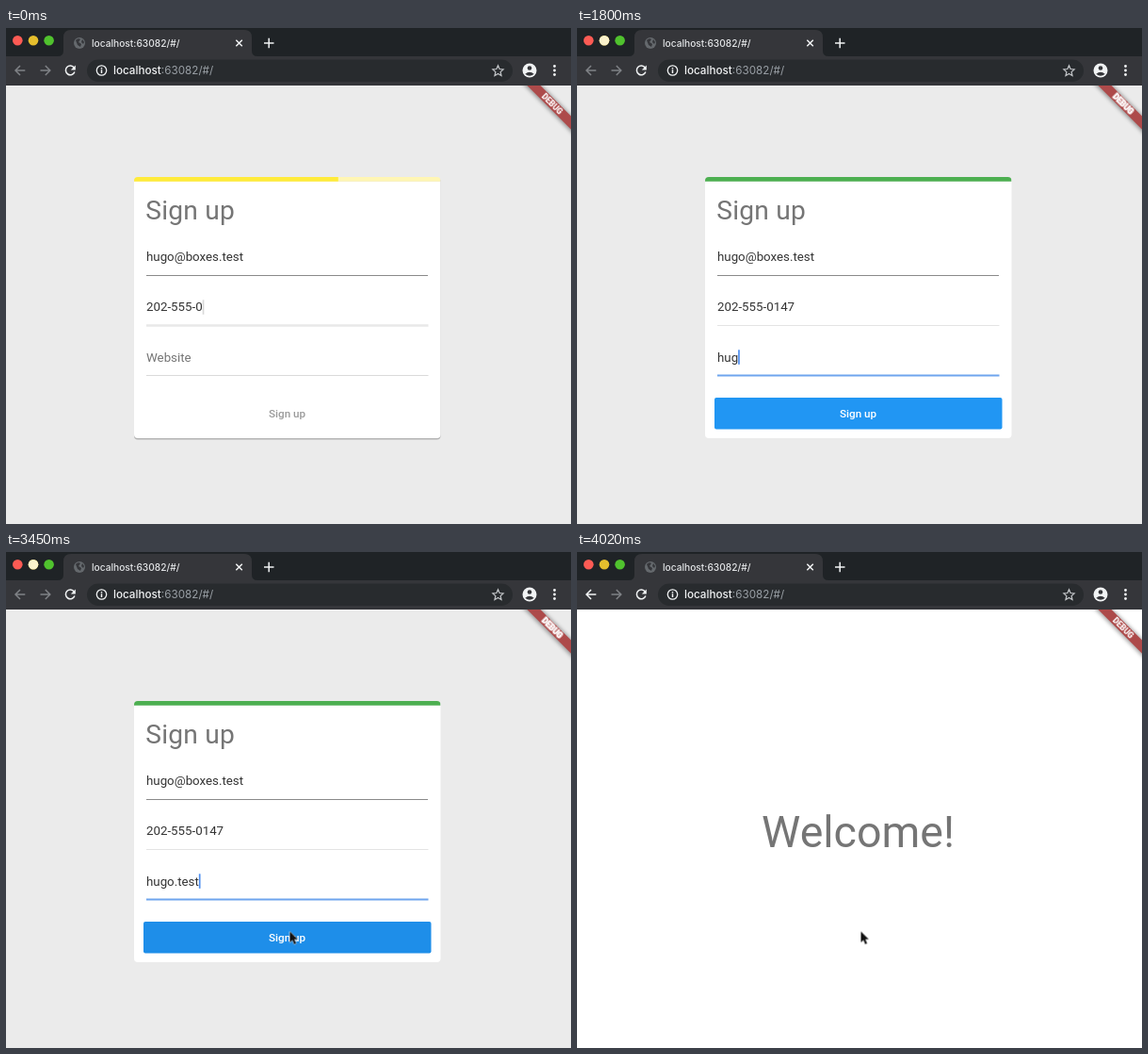
An HTML page for the animation above (4230 ms loop, 600x526 px).

```html
<!DOCTYPE html>
<html lang="en">
<head>
<meta charset="utf-8">
<title>Sign up</title>
<style>
  html, body { margin: 0; width: 100%; height: 100%; overflow: hidden; background: #ebebeb; }
  svg { display: block; width: 600px; height: 526px; }
  text { font-family: Roboto, Arial, sans-serif; white-space: pre; }
  .ui { font-family: Inter, "Open Sans", sans-serif; }
  .field { font-size: 13.3px; fill: #333; }
  .hint { fill: #757575; }
  .anim { animation: 4230ms linear infinite; }

  #pale { animation-name: pale; }
  @keyframes pale { 0%, 29.07% { opacity: 0 } 29.08%, 92.2% { opacity: 1 } 92.21%, 100% { opacity: 0 } }

  #back { animation-name: back; }
  @keyframes back { 0%, 84.39% { stroke: #7f8286 } 84.4%, 100% { stroke: #f1f3f4 } }

  #idle { animation-name: idle; }
  @keyframes idle { 0%, 29.07% { opacity: 1 } 29.08%, 100% { opacity: 0 } }

  #bar { transform-origin: 136px 0; animation-name: bar; }
  @keyframes bar {
    0%, 29.08% { transform: scaleX(.666); fill: #ffeb3b }
    38.53%, 100% { transform: none; fill: #4caf50 }
  }

  #line2 { animation-name: line2; }
  @keyframes line2 {
    0%, 14.89% { stroke: #e8e8e8; stroke-width: 2.6px }
    20.57%, 29.07% { stroke: #8a8a8a; stroke-width: 1px }
    29.08%, 83.68% { stroke: #e4e4e4; stroke-width: 1px }
    83.69%, 100% { stroke: #8a8a8a; stroke-width: 1px }
  }
  #line3 { animation-name: line3; }
  @keyframes line3 {
    0%, 14.89% { stroke: #dadada; stroke-width: 1.2px }
    20.57%, 29.07% { stroke: #e8e8e8; stroke-width: 2.6px }
    29.08%, 83.68% { stroke: #6fa5ee; stroke-width: 2px }
    83.69%, 100% { stroke: #a3b1cf; stroke-width: 1.6px }
  }

  #button { animation-name: button; }
  @keyframes button {
    0%, 29.08% { fill: #fff }
    33.81%, 75.18% { fill: #2196f3 }
    78.01%, 100% { fill: #1e8ee9 }
  }
  #label { animation-name: label; }
  @keyframes label { 0%, 29.08% { fill: #9a9a9a } 33.81%, 100% { fill: #fff } }

  #veil { animation-name: veil; }
  @keyframes veil {
    0%, 84.54% { opacity: 0; animation-timing-function: cubic-bezier(.42, 0, 1, 1) }
    91.63%, 100% { opacity: 1 }
  }
  #rise { animation-name: rise; }
  @keyframes rise {
    0%, 84.54% { transform: translateY(116px); animation-timing-function: cubic-bezier(.4, 0, .2, 1) }
    91.63%, 100% { transform: none }
  }
  #welcome { animation-name: welcome; }
  @keyframes welcome {
    0%, 84.54% { opacity: 0; animation-timing-function: cubic-bezier(.75, 0, 1, .8) }
    91.63%, 100% { opacity: 1 }
  }

  #debug { animation-name: debug; }
  @keyframes debug {
    0%, 29.07% { stroke-opacity: 0 } 29.08%, 84.39% { stroke-opacity: .75 } 84.4%, 100% { stroke-opacity: 0 }
  }

  #mouse { animation-name: mouse; }
  @keyframes mouse {
    0%, 66.66% { opacity: 0; transform: translate(166px, 350px) }
    66.67% { opacity: 1; transform: translate(166px, 350px); animation-timing-function: ease-in-out }
    78.72%, 100% { opacity: 1; transform: translate(301.5px, 402.5px) }
  }
</style>
</head>
<body>
<svg viewBox="0 0 600 526">
  <defs>
    <clipPath id="page"><rect y="61" width="600" height="465"/></clipPath>
    <filter id="soft" x="-20%" y="-60%" width="140%" height="220%"><feGaussianBlur stdDeviation="2"/></filter>
  </defs>
  <rect width="600" height="526" fill="#ebebeb"/>

  <!-- sign-up card -->
  <g id="idle" class="anim">
    <rect x="136" y="159" width="325.5" height="277.6" rx="4" fill="#b3b3b3"/>
  </g>
  <path d="M136 162.5H461.5V431a4 4 0 0 1-4 4H140a4 4 0 0 1-4-4Z" fill="#fff"/>
  <clipPath id="cap"><path d="M136 163V162a4 4 0 0 1 4-4H457.500a4 4 0 0 1 4 4V163Z"/></clipPath>
  <g clip-path="url(#cap)">
    <rect x="136" y="158" width="325.5" height="4.7" fill="#ebebeb"/>
    <g class="anim" style="animation-name: idle">
      <rect x="136" y="158" width="325.5" height="4.7" fill="#fff6b4"/>
    </g>
    <rect id="bar" class="anim" x="136" y="158" width="325.5" height="4.7"/>
  </g>
  <text x="148.3" y="202.8" font-size="28.2" letter-spacing=".2" fill="#757575">Sign up</text>
  <text class="field" x="149" y="247.300">hugo@boxes.test</text>
  <text class="field" x="149" y="300.4" id="phone"></text>
  <text class="field" x="149" y="353.5" id="site"></text>
  <path d="M149 262.500H448" stroke="#8a8a8a"/>
  <path id="line2" class="anim" d="M149 315.500H448.500"/>
  <path id="line3" class="anim" d="M149 368.500H448.500"/>
  <rect id="caret" width="1.7" height="15.5"/>
  <rect id="button" class="anim" x="146" y="392" width="305.500" height="33.500" rx="2"/>
  <text id="label" class="anim" x="298.600" y="413" font-size="11.7" font-weight="500" text-anchor="middle">Sign up</text>

  <!-- next page -->
  <rect id="veil" class="anim" y="61" width="600" height="465" fill="#fff"/>
  <g clip-path="url(#page)">
    <g id="rise" class="anim">
      <text id="welcome" class="anim" x="298.5" y="312.500" font-size="46.5" text-anchor="middle" fill="#757575">Welcome!</text>
    </g>
    <g transform="translate(580 80.500) rotate(45)">
      <rect x="-45" y="-5.5" width="90" height="12" fill="#000" opacity=".4" filter="url(#soft)"/>
      <rect x="-45" y="-5" width="90" height="10" fill="#ad4a4a"/>
      <text id="debug" class="anim" y="3" font-size="8.5" font-weight="900" text-anchor="middle" fill="#fff" stroke="#fff" stroke-width=".9">DEBUG</text>
    </g>
  </g>

  <!-- browser frame -->
  <rect width="600" height="31" fill="#1f2326"/>
  <rect y="30" width="600" height="31" fill="#35363a"/>
  <path d="M55 30q6 0 6-6V10q0-8 8-8H253q8 0 8 8V24q0 6 6 6Z" fill="#35363a"/>
  <rect x="86" y="33.500" width="452" height="23.500" rx="11.750" fill="#282b2e"/>
  <circle cx="12.300" cy="13.300" r="5.300" fill="#fc5b54"/>
  <circle cx="29" cy="13.300" r="5.300" fill="#e6bf2d"/>
  <circle id="pale" class="anim" cx="29" cy="13.300" r="5.300" fill="#faf2cc"/>
  <circle cx="45.600" cy="13.300" r="5.300" fill="#50c22e"/>
  <circle cx="78" cy="16" r="6" fill="#65696d"/>
  <path d="M74 13q3-3 5-1l-2 3 3 2-1 3-3-2ZM81 12l2 3-1 2-2-2Z" fill="#35363a"/>
  <text class="ui" x="91" y="19.700" font-size="10.2" font-weight="500" fill="#e4e6e8">localhost:63082/#/</text>
  <text class="ui" x="114" y="49.300" font-size="11.7" fill="#9aa0a6"><tspan fill="#f1f3f4" font-weight="500">localhost</tspan>:63082/#/</text>
  <g fill="none" stroke="#f1f3f4" stroke-width="1.5">
    <path d="M244.300 12.700l6.500 6.500m0-6.500l-6.500 6.500M274 16h10.500M279.200 10.800v10.500"/>
    <path id="back" class="anim" d="M20.300 45H10.200M15 40l-5 5 5 5"/>
    <path d="M36.500 45H46.600M41.800 40l5 5-5 5" stroke="#7f8286"/>
    <path d="M72.300 42a4.900 4.900 0 1 0 .6 4.500"/>
    <path d="M73.800 39.500v5h-5Z" fill="#f1f3f4" stroke="none"/>
    <circle cx="101.500" cy="45" r="5.200" stroke-width="1.300"/>
    <path d="M101.500 44.300v3.600M101.500 42v1.400"/>
    <path d="M522.500 39.800l1.600 3.700 4 .4-3 2.700.9 4-3.500-2.100-3.500 2.100.9-4-3-2.700 4-.4Z" stroke="#c5c8cb" stroke-width="1.200"/>
  </g>
  <circle cx="556" cy="45" r="7.500" fill="#f1f3f4"/>
  <g fill="#35363a">
    <circle cx="556" cy="42.500" r="2.300"/>
    <path d="M551.300 48.700q4.700-4 9.400 0-4.700 4.200-9.400 0Z"/>
  </g>
  <g fill="#f1f3f4">
    <circle cx="582.500" cy="40.500" r="1.400"/>
    <circle cx="582.500" cy="45" r="1.400"/>
    <circle cx="582.500" cy="49.500" r="1.400"/>
  </g>

  <path id="mouse" class="anim" d="M0 0V11.500L2.700 9 4.600 13.400 6.600 12.500 4.700 8.200H8.300Z" fill="#111" stroke="#fff" stroke-width="1" paint-order="stroke"/>
</svg>
<script>
  const LOOP = 4230, STEP = 30;
  const FOCUS_SITE = 870, TYPE_SITE = 1230, BLUR = 3540;
  const get = id => document.getElementById(id);
  const phone = get('phone'), site = get('site'), caret = get('caret');

  const phoneKeys = [90, 270, 480];
  const siteKeys = [TYPE_SITE, 1410, 1590, 1830, 2100, 2280, 2340, 2400, 2460];

  const typed = (text, start, keys, t) =>
    text.slice(0, start + keys.filter(k => k <= t).length);

  function setText(el, text) {
    if (el.textContent !== text) el.textContent = text;
  }

  function render(t) {
    const url = typed('hugo.test', 0, siteKeys, t);
    setText(phone, typed('202-555-0147', 9, phoneKeys, t));
    setText(site, url || 'Website');
    site.classList.toggle('hint', !url);

    const onSite = t >= FOCUS_SITE;
    const width = !onSite ? phone.getComputedTextLength() : url ? site.getComputedTextLength() : 0;
    caret.setAttribute('x', 149 + width);
    caret.setAttribute('y', onSite ? 341.3 : 288.3);
    caret.setAttribute('fill', t < TYPE_SITE ? '#d9d9d9' : '#4f8ff0');
    caret.setAttribute('opacity', t < BLUR && (t < 630 || onSite) ? 1 : 0);
  }

  const origin = performance.now();
  function tick() {
    const t = (performance.now() - origin) % LOOP;
    render(Math.floor(t / STEP) * STEP);
    requestAnimationFrame(tick);
  }
  tick();
</script>
</body>
</html>
```
